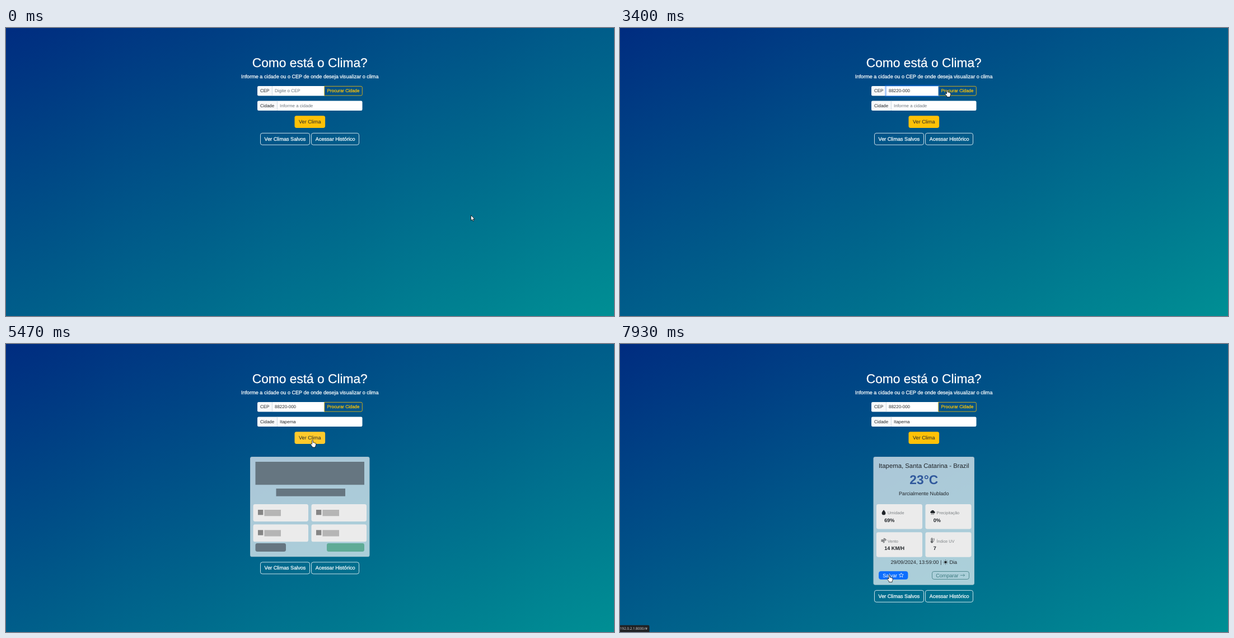
Recreate the animation shown at these times as an HTML page with a canvas. Size 1086 by 516 pixels, loop 8 s.

```html
<!DOCTYPE html>
<html lang="pt-BR">
<head>
<meta charset="utf-8">
<title>Como está o Clima?</title>
<style>
  html, body { margin: 0; width: 100%; height: 100%; overflow: hidden; }
  canvas { display: block; background: linear-gradient(to bottom right, #002c80, #008f94); }
</style>
</head>
<body>
<canvas id="stage" width="1086" height="516"></canvas>
<script>
const ctx = document.getElementById('stage').getContext('2d');
const SANS = '"Liberation Sans", Arial, sans-serif';
const LOOP = 8000, TICK = 200 / 3;
const MID = 542.75;
const SM = 7.96, MD = 9.1;
const WHITE = '#fff', DARK = '#212529', GREY = '#6c757d', YELLOW = [255, 193, 7], BLUE = '#0d6efd';
const CEP = '88220-000', CITY = 'Itapema';

ctx.textRendering = 'geometricPrecision';

const clamp = v => Math.max(0, Math.min(1, v));
const ramp = (k, a, b) => clamp((k - a) / (b - a));
const pulse = (k, a, b, c, d) => ramp(k, a, b) - ramp(k, c, d);
const mix = (a, b, p) => `rgb(${a.map((v, i) => Math.round(v + (b[i] - v) * p))})`;
const inside = (p, [x, y, w, h]) => p.x >= x && p.x <= x + w && p.y >= y && p.y <= y + h;

function box([x, y, w, h], radius, fill, stroke) {
  ctx.beginPath();
  ctx.roundRect(x, y, w, h, radius);
  if (fill) { ctx.fillStyle = fill; ctx.fill(); }
  if (stroke) { ctx.strokeStyle = stroke; ctx.lineWidth = 0.8; ctx.stroke(); }
}

function text(str, x, y, size, color, align = 'left', weight = 400, family = SANS) {
  ctx.font = `${weight} ${size}px ${family}`;
  ctx.textAlign = align;
  ctx.fillStyle = color;
  ctx.fillText(str, x, y);
}

// Light text on the dark page looks slightly heavier.
function lightText(str, x, y, size, color = WHITE, align = 'center') {
  text(str, x, y, size, color, align);
  ctx.strokeStyle = color;
  ctx.lineWidth = 0.25;
  ctx.strokeText(str, x, y);
}

// Icons live on a 16-unit grid.
function polar(n, radius) {
  return Array.from({ length: n }, (_, i) => {
    const a = i * 2 * Math.PI / n - Math.PI / 2;
    return [8 + radius(i) * Math.cos(a), 8 + radius(i) * Math.sin(a)];
  });
}
const starPath = 'M' + polar(10, i => i % 2 ? 3.4 : 7.4).join('L') + 'Z';
const rayPath = polar(8, () => 5.6).map((p, i) => `M${p}L${polar(8, () => 7.8)[i]}`).join('');
const ICONS = {
  drop: { fill: 'M8 0C8 0 2 6.4 2 10a6 6 0 0 0 12 0C14 6.4 8 0 8 0Z' },
  rain: {
    fill: 'M3.5 10.5a3.3 3.3 0 0 1 -.4 -6.5A5 5 0 0 1 12.6 4.6A3 3 0 0 1 13 10.5Z',
    line: 'M4.5 12l-1 3M8 12l-1 3M11.5 12l-1 3'
  },
  wind: { line: 'M0 6h9.5a2.2 2.2 0 1 0 -2.2 -2.4M0 8.5h13a2.4 2.4 0 1 0 -2.4 -2.9M0 11h8a2 2 0 1 1 -2 2.2' },
  thermo: {
    fill: 'M5.5 10a2.2 2.2 0 1 0 .01 0ZM5 4h1v8h-1Z',
    line: 'M3.5 9V2.5a2 2 0 0 1 4 0V9a3.5 3.5 0 1 1 -4 0M11 2h2M11 5h3M11 8h2M11 11h1'
  },
  sun: { fill: 'M8 4a4 4 0 1 0 .01 0Z', line: rayPath },
  star: { line: starPath },
  arrow: { line: 'M1 8H14.5M10.5 4L14.5 8L10.5 12' }
};

function icon(name, x, y, color) {
  const { fill, line } = ICONS[name];
  ctx.save();
  ctx.translate(x, y);
  ctx.scale(MD / 16, MD / 16);
  ctx.fillStyle = ctx.strokeStyle = color;
  ctx.lineWidth = 1.3;
  if (fill) ctx.fill(new Path2D(fill));
  if (line) ctx.stroke(new Path2D(line));
  ctx.restore();
}

// Fixed controls: x, y, width, height
const cepField = [475.5, 104, 93.5, 17.5];
const cityField = [484.5, 130.5, 152, 17.5];
const searchBtn = [568.5, 104.4, 67.8, 16.6];
const viewBtn = [515.5, 157.2, 54.6, 21.7];
const saveBtn = [462.5, 407.5, 51.5, 14];

// Pointer stops: tick, x, y
const ROUTE = [
  [0, 830.5, 335.5], [2, 775, 296], [5, 608, 168], [8, 541, 113],
  [47, 541, 113], [51, 584.5, 110.5],
  [69, 584.5, 110.5], [72, 558.5, 161.5], [75, 547.5, 172],
  [88, 547.5, 172], [89, 548, 172.5], [97, 548, 172.5],
  [103, 836, 445], [104, 828.5, 466.5], [106, 537, 494],
  [108, 537, 494], [112, 468, 474], [117, 481, 413.5], [120, 481, 413.5]
];

function pointerAt(k) {
  const i = Math.max(1, ROUTE.findIndex(stop => stop[0] >= k));
  const [t0, x0, y0] = ROUTE[i - 1], [t1, x1, y1] = ROUTE[i];
  const p = ramp(k, t0, t1);
  return { x: x0 + (x1 - x0) * p, y: y0 + (y1 - y0) * p };
}

const ARROW = new Path2D('M0 0V16.5L3.8 13L6.3 18.6L9 17.5L6.5 12H11.5Z');
const HAND = new Path2D('M-1.7 13V2.2Q-1.7 .5 0 .5T1.7 2.2V8Q4.4 6.6 5 9Q7.4 7.8 8 10Q10.8 9.4 10.8 12V16L9 20V23H-1V20.5L-6.3 14Q-6.4 11.4 -4 12Z');
const BEAM = new Path2D('M-4 -7H-1.5Q0 -7 0 -5.5Q0 -7 1.5 -7H4M0 -5.5V5.5M-4 7H-1.5Q0 7 0 5.5Q0 7 1.5 7H4');

function pointer(p, k) {
  const buttons = k >= 91 ? [searchBtn, viewBtn, saveBtn] : [searchBtn, viewBtn];
  ctx.save();
  ctx.translate(p.x, p.y);
  ctx.scale(0.57, 0.57);
  if (inside(p, cepField) || inside(p, cityField)) {
    ctx.strokeStyle = '#111';
    ctx.lineWidth = 1.6;
    ctx.stroke(BEAM);
  } else {
    const shape = buttons.some(b => inside(p, b)) ? HAND : ARROW;
    ctx.fillStyle = WHITE;
    ctx.strokeStyle = '#000';
    ctx.lineWidth = 1.3;
    ctx.fill(shape);
    ctx.stroke(shape);
  }
  ctx.restore();
}

function typedCep(k) {
  if (k < 21) return '';
  if (k < 25) return CEP.slice(0, k < 23 ? 1 : 2);
  const n = 3 + Math.floor((k - 25) / 3);
  return CEP.slice(0, n > 5 ? n + 1 : n);   // the hyphen comes with the next digit
}

function label(str, y, w) {
  box([449, y, w, 17.5], [2.3, 0, 0, 2.3], '#f8f9fa');
  text(str, 454, y + 11.2, SM, DARK);
}

function fields(k) {
  const focus = pulse(k, 11, 13.5, 53, 55);
  const hover = pulse(k, 51, 53.3, 70.9, 73.1);
  label('CEP', 104, 26.5);
  box(cepField, 0, WHITE);
  box([475, 104, 0.6, 17.5], 0, '#dee2e6');
  box(searchBtn, [0, 2.3, 2.3, 0], `rgba(${YELLOW},${hover})`, `rgb(${YELLOW})`);
  lightText('Procurar Cidade', 573.5, 115.1, SM, mix(YELLOW, [0, 0, 0], hover), 'left');

  if (focus) {
    ctx.globalAlpha = focus;
    ctx.strokeStyle = 'rgba(13,110,253,.3)';
    ctx.lineWidth = 2.2;
    ctx.strokeRect(474.1, 102.9, 95.8, 19.7);
    ctx.strokeStyle = '#86b7fe';
    ctx.lineWidth = 0.6;
    ctx.strokeRect(475.4, 104.2, 93.3, 17.1);
    ctx.globalAlpha = 1;
  }

  const cep = typedCep(k);
  text(cep || 'Digite o CEP', 480, 115.2, SM, cep ? DARK : GREY);
  if ((k >= 12 && k < 19) || (k >= 21 && k < 48)) {
    const x = 480 + (cep ? ctx.measureText(cep).width : 0);
    box([x, 108, 0.6, 9.5], 0, DARK);
  }

  label('Cidade', 130.5, 35.5);
  box(cityField, [0, 2.3, 2.3, 0], WHITE);
  box([484, 130.5, 0.6, 17.5], 0, '#dee2e6');
  const filled = k >= 64;
  text(filled ? CITY : 'Informe a cidade', 489, 141.8, SM, filled ? DARK : GREY);
}

function links(y) {
  box([454.5, y + 0.4, 88, 21], 3.4, null, WHITE);
  lightText('Ver Climas Salvos', 498.5, y + 13.7, MD);
  box([545.5, y + 0.4, 85, 21], 3.4, null, WHITE);
  lightText('Acessar Histórico', 588.2, y + 13.7, MD);
}

function card(x, w, h) {
  box([x, 202, w, h], 3.4, 'rgba(255,255,255,.67)');
  box([x + 0.3, 202.3, w - 0.6, h - 0.6], 3.4, null, 'rgba(0,0,0,.08)');
}

function skeleton() {
  const slate = '#667681';
  card(436, 213.5, 179.3);
  box([445.5, 211, 194.5, 41.3], 0, slate);
  box([482.5, 259, 123.5, 13.8], 0, slate);
  for (const y of [287, 323.3]) {
    for (const [x, ix] of [[441.5, 450], [545.5, 554]]) {
      box([x, y, 98.5, 31], 3.4, '#ebebeb');
      box([ix, y + 10, 9.3, 9.3], 0, '#858585');
      box([ix + 11.4, y + 10, 29.6, 11.3], 0, '#b5b5b5');
    }
  }
  box([445.5, 357, 54.5, 15], 3.4, slate);
  box([573, 357, 67, 15], 3.4, '#5fab96');
}

const TILES = [
  ['drop', 'Umidade', '69%'], ['rain', 'Precipitação', '0%'],
  ['wind', 'Vento', '14 KM/H'], ['thermo', 'Índice UV', '7']
];

function weather(k) {
  card(452.5, 180.5, 229.7);
  text(CITY + ', Santa Catarina - Brazil', MID, 222, 11.37, DARK, 'center');
  text('23°C', MID, 251.2, 22.74, '#30599c', 'center', 700);
  text('Parcialmente Nublado', MID, 271.1, MD, DARK, 'center');
  TILES.forEach(([glyph, name, value], i) => {
    const x = i % 2 ? 545.5 : 458, y = i < 2 ? 287 : 337.2;
    box([x, y, 82, 44.5], 3.4, '#ebebeb');
    icon(glyph, x + 8.5, y + 10.2, DARK);
    text(name, x + 20, y + 18.3, 7.4, '#7d8285');
    text(value, x + 14.2, y + 32.1, MD, DARK, 'left', 700);
  });
  text('29/09/2024, 13:59:00 |', 483.4, 394.2, MD, DARK);
  icon('sun', 577, 386.4, DARK);
  text('Dia', 588.4, 394.2, MD, DARK);

  const hover = ramp(k, 116, 118.3);
  const ink = mix([13, 110, 253], [255, 255, 255], hover);
  box(saveBtn, 3.4, `rgba(13,110,253,${hover})`, BLUE);
  text('Salvar', 469.3, 417.6, MD, ink);
  icon('star', 497.8, 409.8, ink);
  const teal = '#3a797f';
  box([557.5, 407.5, 66, 14], 3.4, null, teal);
  text('Comparar', 564.2, 417.6, MD, teal);
  icon('arrow', 607.3, 409.8, teal);
}

function statusBar(alpha) {
  if (!alpha) return;
  ctx.globalAlpha = alpha;
  box([-1, 503.8, 53.5, 13], [0, 2.3, 0, 0], '#202124');
  text('192.0.2.1:8000/#', 0, 512.4, 6.3, '#dcdcdc', 'left', 400, '"Open Sans", sans-serif');
  ctx.globalAlpha = 1;
}

function draw(k) {
  ctx.clearRect(0, 0, 1086, 516);
  lightText('Como está o Clima?', MID, 70.2, 22.74);
  lightText('Informe a cidade ou o CEP de onde deseja visualizar o clima', MID, 90.3, MD);
  fields(k);

  const hover = pulse(k, 72, 74.3, 98, 100.3);
  box(viewBtn, 3.4, mix(YELLOW, [255, 202, 44], hover));
  text('Ver Clima', MID, 171, MD, DARK, 'center');

  if (k >= 91) weather(k);
  else if (k >= 81) skeleton();
  links(k >= 91 ? 441 : k >= 81 ? 390.5 : 188);
  statusBar(ramp(k, 116, 118));
  pointer(pointerAt(k), k);
}

function frame(now) {
  draw(Math.floor((now % LOOP + 7) / TICK) % 120);
  requestAnimationFrame(frame);
}
requestAnimationFrame(frame);
</script>
</body>
</html>
```
